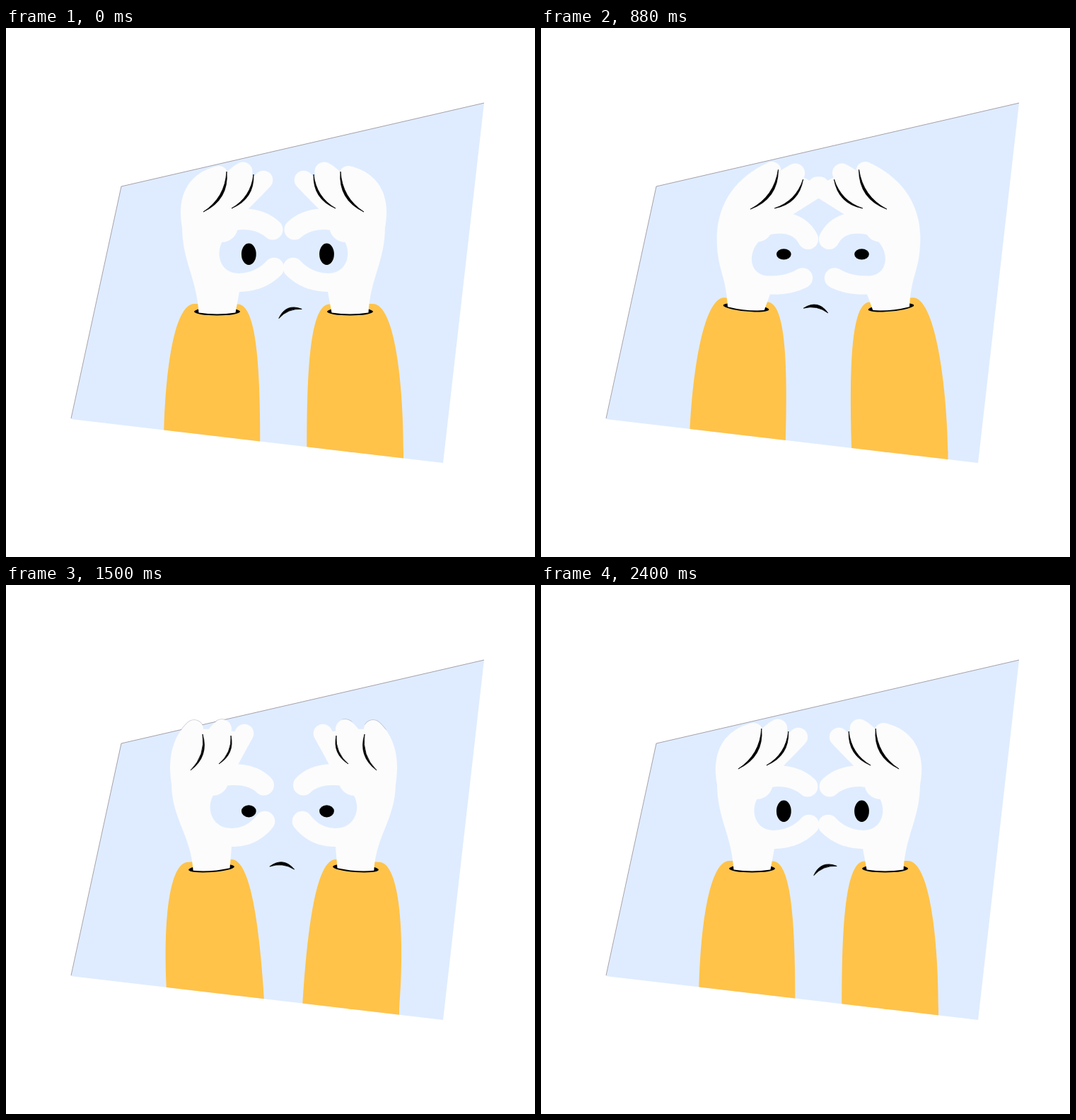
Write an HTML page with a canvas that moves like this. It is 748 px wide and 748 px high and loops after 2.58 s.

```html
<!DOCTYPE html>
<html lang="en">
<head>
<meta charset="utf-8">
<title>Hand goggles</title>
<style>
html, body { margin: 0; width: 100%; height: 100%; overflow: hidden; background: #fff; }
canvas { display: block; }
</style>
</head>
<body>
<canvas id="stage" width="748" height="748"></canvas>
<script>
const ctx = document.getElementById('stage').getContext('2d');
const LOOP = 2580, LAST = 2400, STEP = 20, AXIS = 392.5, TAU = 2 * Math.PI;
const BLUE = '#dfecff', YELLOW = '#ffc34a', GLOVE = '#fcfcfc', INK = '#000';

// Root and tip radius of each limb.
const RADII = { outer: [24, 13], middle: [23, 13.5], inner: [14, 13.3], index: [15, 14.5], thumb: [13, 14.3] };

// Limbs run root, bend, tip; creases run top, bottom; cuff is x, y, tilt;
// sleeve holds the x of the left hem, left side, right side, right hem.
const near = {
  outer: [[273, 280], [256, 225], [301, 208]],
  middle: [[305, 280], [303, 228], [335, 203]],
  inner: [[315, 263], [340, 240], [364, 215]],
  index: [[335, 270], [362, 271], [377, 285]],
  thumb: [[330, 360], [360, 359], [379, 339]],
  creases: [[312, 203], [279, 260], [350, 207], [319, 255]],
  cuff: [298.5, 401, 0],
  sleeve: [223, 223, 360, 359.5]
};
const tight = {
  outer: [[273, 295], [270, 235], [328, 202]],
  middle: [[305, 280], [315, 235], [361, 205]],
  inner: [[330, 264], [363, 244], [396, 224]],
  index: [[335, 276], [366, 275], [378, 299]],
  thumb: [[324, 364], [352, 364], [370, 354]],
  creases: [[337, 200], [297, 256], [372, 214], [331, 255]],
  cuff: [290, 395, 0.1],
  sleeve: [209, 211, 349, 345]
};
const wide = {
  outer: [[258, 280], [244, 232], [266, 204]],
  middle: [[292, 275], [284, 228], [305.5, 203.5]],
  inner: [[308, 262], [322, 236], [337, 210]],
  index: [[320, 268], [350, 268], [364.5, 283]],
  thumb: [[319, 357], [348, 357], [366, 334]],
  creases: [[278, 211], [261, 262], [318, 213], [301, 253]],
  cuff: [290.5, 400.5, -0.07],
  sleeve: [229, 221, 359, 366]
};

const lerp = (a, b, k) => a + (b - a) * k;
const progress = (t, from, to) => Math.min(1, Math.max(0, (t - from) / (to - from)));
const smooth = u => u * u * (3 - 2 * u);

// Cubic timing curve (.25, 0, .05, 1): quick start, long settle.
function snap(x) {
  let lo = 0, hi = 1;
  for (let i = 0; i < 24; i++) {
    const s = (lo + hi) / 2, r = 1 - s;
    if (0.75 * s * r * r + 0.15 * s * s * r + s * s * s < x) lo = s; else hi = s;
  }
  return smooth((lo + hi) / 2);
}

function mix(a, b, k) {
  if (typeof a === 'number') return lerp(a, b, k);
  if (Array.isArray(a)) return a.map((v, i) => mix(v, b[i], k));
  return Object.fromEntries(Object.keys(a).map(key => [key, mix(a[key], b[key], k)]));
}

function poseAt(t) {
  if (t < 840) return mix(near, tight, snap(progress(t, 0, 500)));
  if (t < 1680) return mix(tight, wide, snap(progress(t, 840, 1500)));
  return mix(wide, near, snap(progress(t, 1680, 2500)));
}

// A point given relative to the tilted cuff.
function onCuff([x, y, tilt], dx, dy) {
  const c = Math.cos(tilt), s = Math.sin(tilt);
  return [x + dx * c - dy * s, y + dx * s + dy * c];
}

// Tapered round limb swept along a quadratic curve.
function addLimb(path, [root, bend, tip], [r0, r1]) {
  const steps = 60;
  for (let i = 0; i <= steps; i++) {
    const u = i / steps;
    const [x, y] = [0, 1].map(k => lerp(lerp(root[k], bend[k], u), lerp(bend[k], tip[k], u), u));
    const r = lerp(r0, r1, u);
    path.moveTo(x + r, y);
    path.arc(x, y, r, 0, TAU);
  }
}

function handPath(pose) {
  const path = new Path2D();
  const { outer, middle, inner, index, thumb, cuff } = pose;
  const [ix, iy] = index[0], [tx, ty] = thumb[0];
  const holeTop = iy + RADII.index[0], holeBottom = ty - RADII.thumb[0];
  const left = onCuff(cuff, -26, 1.5), right = onCuff(cuff, 26, 1.5);
  const side = [outer[0][0] - RADII.outer[0], outer[0][1]];

  path.moveTo(...outer[2]);
  path.lineTo(...middle[2]);
  path.lineTo(...inner[2]);
  path.lineTo(ix, iy);
  path.lineTo(ix, holeTop);
  path.bezierCurveTo(ix - 41, holeTop, tx - 41, holeBottom, tx, holeBottom);
  path.lineTo(tx, ty + RADII.thumb[0]);
  path.lineTo(...right);
  path.quadraticCurveTo(...onCuff(cuff, 0, 5.5), ...left);
  path.bezierCurveTo(left[0] - 3, left[1] - 50, side[0], side[1] + 50, ...side);
  path.closePath();
  for (const name in RADII) addLimb(path, pose[name], RADII[name]);
  return path;
}

const panel = new Path2D('M163 224L676 106L618 615L92 553Z');
const outside = new Path2D(panel);
outside.rect(0, 0, 748, 748);

// Crescent between two points; bows are fractions of its length.
function crescent([x0, y0], [x1, y1], bowOut, bowIn) {
  const bent = bow => [(x0 + x1) / 2 + (y0 - y1) * bow, (y0 + y1) / 2 + (x1 - x0) * bow];
  ctx.fillStyle = ctx.strokeStyle = INK;
  ctx.lineWidth = 0.8;
  ctx.lineJoin = 'round';
  ctx.beginPath();
  ctx.moveTo(x0, y0);
  ctx.quadraticCurveTo(...bent(bowOut), x1, y1);
  ctx.quadraticCurveTo(...bent(bowIn), x0, y0);
  ctx.fill();
  ctx.stroke();
}

function ellipse(x, y, rx, ry, tilt = 0) {
  ctx.fillStyle = INK;
  ctx.beginPath();
  ctx.ellipse(x, y, rx, ry, tilt, 0, TAU);
  ctx.fill();
}

function mirrored(draw) {
  draw();
  ctx.save();
  ctx.translate(2 * AXIS, 0);
  ctx.scale(-1, 1);
  draw();
  ctx.restore();
}

function drawPanel() {
  ctx.fillStyle = BLUE;
  ctx.fill(panel);
  ctx.strokeStyle = 'rgba(115,105,115,.6)';
  ctx.lineWidth = 1;
  ctx.stroke(new Path2D('M92 552L163 224L676 106'));
}

function drawSleeve({ cuff, sleeve: [hemLeft, sideLeft, sideRight, hemRight] }) {
  const a = onCuff(cuff, -32, -11), b = onCuff(cuff, 29, -10.5);
  ctx.fillStyle = YELLOW;
  ctx.beginPath();
  ctx.moveTo(hemLeft, 600);
  ctx.bezierCurveTo(sideLeft, 500, a[0] - 31, a[1], ...a);
  ctx.lineTo(...b);
  ctx.bezierCurveTo(b[0] + 27, b[1], sideRight, 480, hemRight, 600);
  ctx.fill();
  ellipse(cuff[0], cuff[1], 32.5, 5.5, cuff[2]);
}

function drawHand(outline, creases) {
  ctx.save();
  ctx.clip(outside, 'evenodd');
  ctx.strokeStyle = 'rgba(130,130,150,.4)';
  ctx.lineWidth = 1.6;
  ctx.stroke(outline);
  ctx.restore();
  ctx.fillStyle = GLOVE;
  ctx.fill(outline);
  for (const i of [0, 2]) crescent(creases[i + 1], creases[i], 0.35, 0.25);
}

function drawFace(mood) {
  for (const x of [343.3, 453.5]) ellipse(x, 319.8, 10.4, lerp(15.2, 7.6, mood));
  ctx.save();
  ctx.translate(lerp(402, 388.5, mood), lerp(404, 399.5, mood));
  ctx.rotate(lerp(-22, 11, mood) * Math.PI / 180);
  crescent([-17.5, 0], [17.5, 0], -0.47, -0.24);
  ctx.restore();
}

function draw(t) {
  const pose = poseAt(t);
  const outline = handPath(pose);
  const mood = smooth(progress(t, 0, 660)) - smooth(progress(t, 1320, 2120));
  ctx.fillStyle = '#fff';
  ctx.fillRect(0, 0, 748, 748);
  drawPanel();
  ctx.save();
  ctx.clip(panel);
  // Hems run below the panel, which cuts them off.
  mirrored(() => drawSleeve(pose));
  ctx.fillStyle = YELLOW;
  const [hemLeft, , , hemRight] = pose.sleeve;
  mirrored(() => ctx.fillRect(hemLeft, 599, hemRight - hemLeft, 30));
  ctx.restore();
  mirrored(() => drawHand(outline, pose.creases));
  drawFace(mood);
}

const start = performance.now();
function tick() {
  const t = (performance.now() - start) % LOOP;
  draw(Math.min(LAST, Math.floor(t / STEP) * STEP));
  requestAnimationFrame(tick);
}
tick();
</script>
</body>
</html>
```
